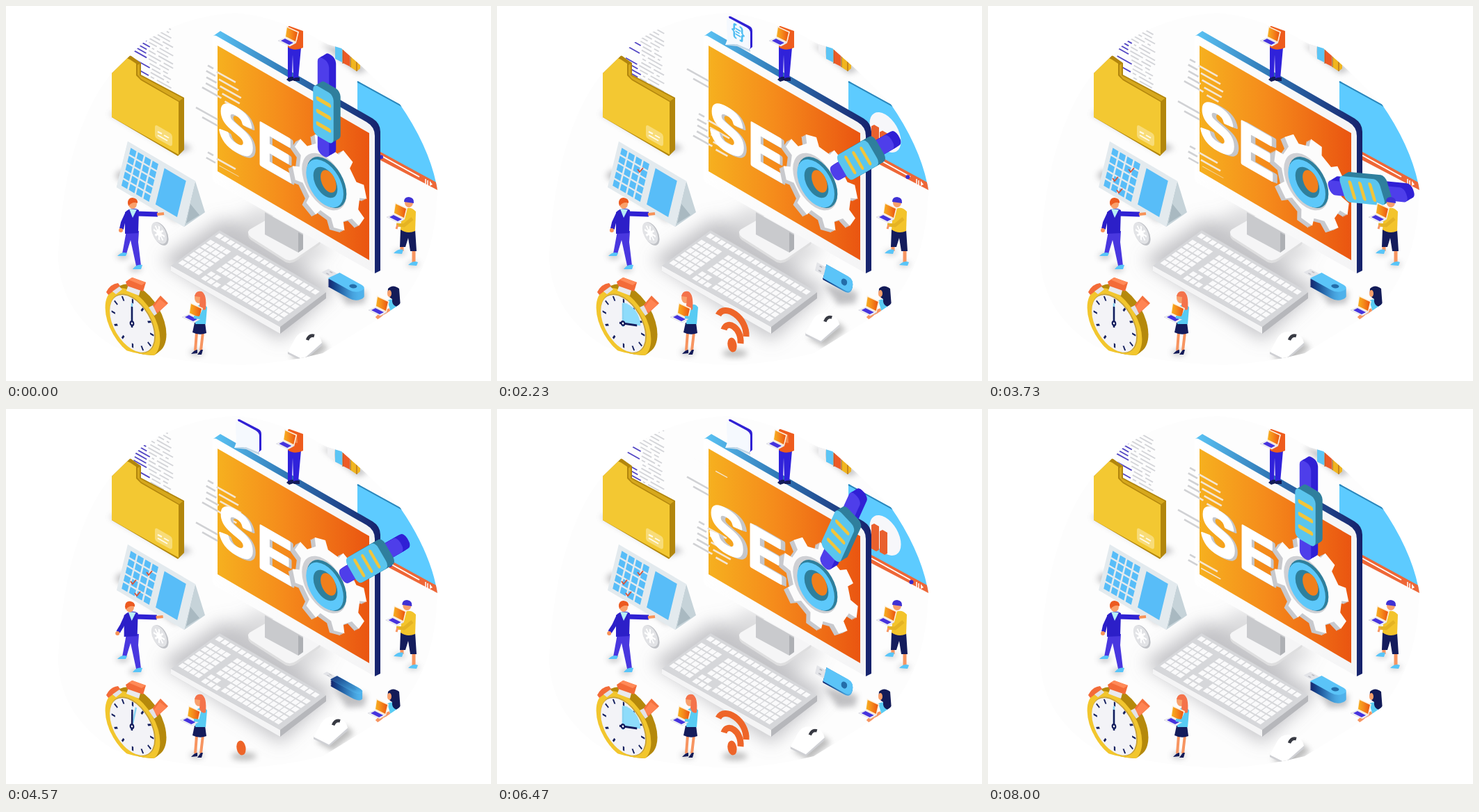
An HTML page for the animation above (8.03 s loop, 697x540 px).

```html
<!DOCTYPE html>
<html lang="en">
<head>
<meta charset="utf-8">
<title>SEO workspace</title>
<style>
html,body{margin:0;width:100%;height:100%;overflow:hidden;background:#fff}
svg{display:block;width:100vw;height:100vh}
text{font-family:"Liberation Sans",Arial,sans-serif;font-weight:bold}
</style>
</head>
<body>
<svg viewBox="0 0 697 540">
<defs>
<clipPath id="stage"><path d="M75 360C80 240 110 145 152 97L197 53C240 25 285 12 332 10Q370 14 402 27L427 36L462 55L482 61L518 93L565 140Q610 205 620 265Q618 370 565 430L530 454L455 500Q400 514 340 517Q270 515 212 503Q185 502 152 489C92 450 75 400 75 360Z"/></clipPath>
<clipPath id="offScreen"><path d="M270 64L304 83V229L270 210Z"/></clipPath>
<clipPath id="onScreen"><path d="M304 83L342 104V250L304 229Z"/></clipPath>
<clipPath id="sheet"><path d="M180 25H241V126L194 100V82L180 72Z"/></clipPath>
<linearGradient id="screen"><stop stop-color="#f6b01f"/><stop offset=".45" stop-color="#f58a1b"/><stop offset="1" stop-color="#ea5511"/></linearGradient>
<linearGradient id="edge"><stop stop-color="#5bc4f5"/><stop offset=".45" stop-color="#2f76b4"/><stop offset="1" stop-color="#16216b"/></linearGradient>
<linearGradient id="navy"><stop stop-color="#15246d"/><stop offset=".25" stop-color="#174a90"/><stop offset="1" stop-color="#51b5ee"/></linearGradient>
<linearGradient id="chin"><stop stop-color="#fff"/><stop offset="1" stop-color="#f4f4f5"/></linearGradient>
<filter id="blur" x="-30%" y="-30%" width="160%" height="160%"><feGaussianBlur stdDeviation="12"/></filter>
<filter id="soft" x="-50%" y="-50%" width="200%" height="200%"><feGaussianBlur stdDeviation="4"/></filter>
<g id="laptop">
<path d="M8 16L24 23L15 28L-2 20Z" fill="#f3f3f6" stroke="#d4d6de" stroke-width=".7"/>
<path d="M8 17L20 23L14 26L2 20Z" fill="#4634dd"/>
<path d="M10 -1L28 7L24 23L8 16Z" fill="#fdf0dc"/><path d="M11 1L26 8L23 21L9 14Z" fill="url(#screen)"/>
</g>
<g id="page"><rect width="1" height="1" fill="#e3eaee"/><g id="cells" fill="#58bdf8"><rect x=".56" y=".1" width=".32" height=".79"/></g></g>
<path id="stick" d="M0 -10H34Q44 -10 44 0Q44 10 34 10H0Z"/>
</defs>

<g clip-path="url(#stage)">
<rect width="697" height="540" fill="#fdfdfd"/>
<g fill="#8d8d93" filter="url(#blur)">
<path d="M222 366L310 306L474 408L395 482Z" opacity=".5"/><path d="M312 314L372 286L470 350L420 384Z" opacity=".3"/>
</g>
<g fill="#77777d" filter="url(#soft)" opacity=".45">
<path d="M148 155L248 212L268 205L170 150Z"/><path d="M156 245L165 235L250 300L246 312Z"/><path d="M453 55L475 60L520 92L505 97Z"/>
<ellipse cx="168" cy="360" rx="9" ry="4"/><ellipse cx="186" cy="378" rx="9" ry="4"/><ellipse cx="274" cy="499" rx="10" ry="4"/>
<ellipse cx="566" cy="355" rx="9" ry="3"/><ellipse cx="585" cy="372" rx="9" ry="3"/><path d="M470 400L518 412L515 428L490 430Z"/>
</g>

<g clip-path="url(#sheet)"><g id="docLines" stroke-width="1.8"/></g>

<!-- folder -->
<path d="M152 64L180 72L194 82V99L256 132V207L247 216L152 160Z" fill="#b2860d"/>
<path d="M152 66L178 77L187 83V100L194 107L248 138V214L152 160Z" fill="#f3c832"/>
<path d="M189 85L192 83V100L254 133L249 137L194 105L189 99Z" fill="#d6a81d"/>
<path d="M217 172L236 183Q239 185 239 188V198Q239 203 235 201L217 191Q214 189 214 186V175Q214 171 217 172Z" fill="#f8dc78"/>
<path d="M218 181L224 184M227 186L234 190M218 186L232 194" stroke="#fffbe8" stroke-width="2"/>

<!-- calendar -->
<path d="M272 252L286 297L256 318Z" fill="#c6d3d9"/><path d="M265 285L278 301L259 313Z" fill="#a9b9c1"/>
<path id="back" fill="#eef2f4"/>
<use href="#page" transform="matrix(97 57 -16 66 175 195)"/>
<g id="checks" fill="none" stroke="#d6533a" stroke-width="1.8"><path d="M185 265l3 4l5 -6"/><path d="M179 248l3 4l5 -6"/><path d="M202 235l3 4l5 -6"/></g>
<use id="flip" href="#page"/>

<!-- books -->
<path id="book" d="M462 50H472V73L462 68Z" fill="#f1f1f3"/>
<path d="M473 50L483 55V81L473 76Z" fill="#5cc5f5"/><path d="M484 55L494 60V87L484 82Z" fill="#ed5a26"/><path d="M495 60L509 70V90L504 94L495 88Z" fill="#f0b51f"/><path d="M484 60V83M495 68V88M504 78V94" stroke="#9d5720"/>

<!-- video window -->
<path d="M505 108L630 177V268L505 200Z" fill="#5dcbff"/><path d="M505 109L630 178" stroke="#2b86bb" stroke-width="2"/>
<g id="chart"><ellipse id="disc" transform="matrix(.866 .5 0 1 558 182)" fill="#f7f7fa"/><path id="bars" fill="#e9602d"/></g>
<path d="M538 210L622 256V266L538 222Z" fill="#ee6737"/><path d="M538 215L594 246" stroke="#fff" stroke-width="2"/>
<path d="M603 249v7M606 251v7" stroke="#fff" stroke-width="1.5"/><path d="M609 252l4 5l-4 2z" fill="#fff"/><circle id="knob" r="3" fill="#3a2bc9"/>

<!-- monitor -->
<path d="M350 326L388 304Q393 302 398 305L449 335Q455 340 449 345L417 367Q410 372 402 369L352 337Q345 331 350 326Z" fill="#dededf"/>
<path d="M350 322L388 300Q393 298 398 301L449 331Q455 336 449 341L417 363Q410 368 402 365L352 333Q345 327 350 322Z" fill="#f5f5f6"/>
<path d="M372 297L427 328V350L420 355L372 329Z" fill="#c9cacd"/><path d="M420 326L427 330V350L420 355Z" fill="#aeb0b4"/>
<path d="M298 43L308 36L527 162Q538 169 538 181V381L530 385L515 190L300 65Z" fill="url(#edge)"/>
<path d="M297 47Q297 40 304 44L518 167Q530 174 530 187V385L301 255Q297 252 297 247Z" fill="url(#chin)"/>
<path d="M304 57L522 183V366L304 238Z" fill="url(#screen)"/>
<g stroke-width="2.6"><g clip-path="url(#offScreen)" stroke="#d0d1d4"><g class="stream"/></g><g clip-path="url(#onScreen)" stroke="#f5e6d2"><g class="stream"/></g></g>
<g id="letters" font-size="87" stroke-width="4" stroke-linejoin="round"/>

<!-- gear -->
<g fill="#c8c9cd"><path class="gear"/><path class="gear"/><path class="gear"/></g><path class="gear" fill="#fcfcfc"/>
<g transform="matrix(.866 .5 0 1 459 254)"><circle r="37" cx="-2" fill="#cfd0d4"/><circle r="33" cx="2" cy="-1" fill="#2e7f9c"/><circle r="31" cx="-1" cy="2" fill="#5dc8fa"/><circle r="20" fill="#2e7f9c"/><ellipse cx="5" cy="-4" rx="13" ry="15" fill="#f07f1c"/></g>
<g id="wrench"/>

<!-- keyboard -->
<path d="M237 374L394 462L460 412V421L394 472L237 382Z" fill="#b6b7bb"/><path d="M237 374L394 462V472L237 382Z" fill="#f4f4f5"/>
<path d="M307 323L460 412L394 462L237 374Z" fill="#d6d7da"/>
<g id="keys" transform="matrix(153 89 -70 51 307 323)" fill="#fafafb"/>

<!-- usb -->
<g id="usbSide" fill="url(#navy)"/>
<g id="usb"><rect x="-14" y="-6" width="16" height="12" fill="#e3e4e8"/><path d="M-9 -3h4M-9 3h4" stroke="#b9bbc2" stroke-width="2"/>
<use href="#stick" fill="#5bc4f8"/><use id="usbShade" href="#stick" fill="url(#navy)"/><circle id="hole" cx="31" r="4.5" fill="#246da9"/></g>

<!-- mouse -->
<g id="mouse"><path d="M457 470L500 448L512 458L482 484Z" fill="#888" opacity=".55" filter="url(#soft)"/>
<path d="M454 463L476 474Q482 452 492 448Q500 446 503 451V455L476 478L454 467Z" fill="#cfd0d4"/><path d="M454 464L465 444Q472 432 488 436Q501 440 503 451L476 475Z" fill="#fff"/>
<path d="M482 447Q485 439 492 441" fill="none" stroke="#383a43" stroke-width="4.5"/></g>

<!-- clock -->
<g transform="matrix(.866 .5 0 1 182 457)">
<circle cx="11" cy="-12" r="45" fill="#b5890c"/><circle cx="6" cy="-6" r="45" fill="#b5890c"/><circle r="45.500" fill="#f2c62d"/><circle r="38" fill="#c7a13a"/><circle cx="-1" cy="1" r="37" fill="#f3f3f7"/>
<g id="ticks" stroke="#15205f" stroke-width="2.6"/></g>
<g transform="matrix(.84 .12 0 1 181 457)"><path id="wedge" fill="#8edcfb"/>
<path id="minute" d="M0 5V-29" stroke="#8ad3f2" stroke-width="3"/><path id="hour" d="M0 6V-24" stroke="#141c5c" stroke-width="3"/><circle r="4" fill="#141c5c"/><circle r="1.5" fill="#fff"/></g>
<path d="M176 401L194 406L191 417L173 410Z" fill="#e9e9ed"/><path d="M172 397L181 391L201 398L197 411L174 403Z" fill="#f36b38"/><path d="M176 394L182 391L201 398L195 402Z" fill="#ff8a58"/>
<path d="M144 412Q150 400 161 399L164 403L147 416Z" fill="#f36b38"/><path d="M153 411L163 404L167 408L158 415Z" fill="#e2e2e8"/>
<path d="M208 434L222 417L233 428L217 443Z" fill="#f4713e"/><path d="M211 435L221 422L231 430L218 441Z" fill="#ff8453"/><path d="M205 434L211 431L217 443L213 446Z" fill="#e2e2e8"/>

<!-- coin -->
<g transform="matrix(.8 .5 0 1 220 327)"><circle cx="2" r="15" fill="#bfc1c6"/><circle r="14" fill="#e2e3e6"/><path id="flower" fill="#fff"/></g>

<!-- wifi -->
<g id="wifi" fill="none" stroke="#ee6529" stroke-width="9"><g><ellipse cx="342" cy="500" rx="18" ry="6" fill="#666" stroke="none" opacity=".4" filter="url(#soft)"/><ellipse cx="338" cy="488" rx="4" ry="8" stroke-width="5" fill="#ee6529" transform="rotate(-10 338 488)"/></g><path d="M326 466C330 451 352 463 350 486"/><path d="M318 445C327 427 360 449 358 476"/></g>

<!-- bubble -->
<g id="bubble"><path d="M333 16Q333 14 336 15L363 29Q367 31 367 36V59L362 63L340 30Z" fill="#3021d4"/>
<path d="M330 22Q330 16 335 18L359 31Q364 34 364 39V59Q364 64 359 62L345 55L328 56L331 48Z" fill="#f5f9fe"/><path d="M328 56L345 55L364 63V66L345 58Z" fill="#c5d9e8"/>
<g transform="matrix(.866 .5 0 1 346 44)" fill="#4fbdf2" font-size="23" text-anchor="middle"><g id="braces"><text x="-6">{</text><text x="7">}</text></g><path id="code" d="M-4 -10H5M-4 -6H3M-4 -2H5" stroke="#4fbdf2" stroke-width="2"/></g></g>

<!-- man above -->
<path d="M405 58L424 60L420 105H413L412 70L411 104H405Z" fill="#3022da"/><path d="M403 106Q408 101 413 102V107L407 109ZM411 106Q415 102 422 103L422 108H414Z" fill="#131b58"/>
<path d="M405 30Q415 22 427 30V60Q414 66 405 59Z" fill="#ee5c1d"/><path d="M418 36L411 48L419 49Z" fill="#f28b52"/>
<use class="lap" href="#laptop" x="393" y="30"/>

<!-- pointing man -->
<path d="M173 324H191L190 340L194 374H187L179 337L173 357H167Z" fill="#4937df"/>
<path d="M160 360Q167 353 174 356L172 360ZM182 379Q188 371 196 373L194 379Z" fill="#58c5f8"/>
<g id="guy"><path d="M171 297Q181 288 191 294L190 327L171 328Z" fill="#2c1fc8"/><path d="M177 292L188 293L182 305Z" fill="#b7eef5"/>
<path d="M188 299L218 300" stroke="#3022d3" stroke-width="7"/><path d="M217 300L227 299" stroke="#f79257" stroke-width="4"/>
<path id="arm" fill="none" stroke="#2c1fc8" stroke-width="6"/><circle id="hand" cy="323" r="3" fill="#f79257"/></g>
<g id="guyHead"><ellipse cx="182" cy="285" rx="6" ry="7" fill="#f9a06b"/><path d="M175 284Q175 276 182 276Q190 277 189 284Q182 281 176 288Z" fill="#ec5a20"/></g>

<!-- standing woman -->
<path d="M274 470L272 496M283 470L280 496" stroke="#f79561" stroke-width="4"/><path d="M266 501Q271 495 275 495V500ZM275 502L280 495H283L281 502Z" fill="#131b58"/>
<path d="M271 456H286L288 471Q278 475 268 470Z" fill="#141c5c"/><path d="M274 433Q284 426 289 434L287 458H272Z" fill="#58cbf3"/>
<g id="herHead"><ellipse cx="277" cy="420" rx="6" ry="8" fill="#f9a06b"/><path d="M271 418Q273 409 281 411Q289 415 287 437Q281 440 278 431L279 419Z" fill="#f4734b"/></g>
<use class="lap" href="#laptop" x="255" y="428"/><path d="M284 438L279 449L270 448" fill="none" stroke="#58cbf3" stroke-width="4"/>

<!-- man in yellow -->
<path d="M569 345V353M586 345V371" stroke="#f79561" stroke-width="5"/><path d="M567 322H588L590 353H581L578 334L574 347H566Z" fill="#141c5c"/><path d="M557 356Q564 349 571 351L569 357ZM578 373Q585 366 592 369L590 374Z" fill="#58c5f8"/>
<path d="M569 295Q580 286 589 296L588 324Q577 329 567 322Z" fill="#f3c42b"/><path d="M584 306L572 316L561 315" fill="none" stroke="#e5b323" stroke-width="5"/><path d="M563 315L561 321" stroke="#f79561" stroke-width="3"/>
<g id="capHead"><ellipse cx="579" cy="283" rx="6" ry="7" fill="#f9a06b"/><path d="M572 282Q572 275 579 275Q587 276 586 284Z" fill="#3f31d4"/></g>
<use class="lap" href="#laptop" x="549" y="284"/>

<!-- seated woman -->
<path d="M533 450L541 442L552 438" fill="none" stroke="#f79561" stroke-width="6"/><path d="M548 424Q562 418 566 434L553 441Z" fill="#58cbf3"/>
<path d="M549 407Q556 400 565 407L567 433Q554 434 555 422Q547 418 549 407Z" fill="#131b58"/><ellipse cx="551" cy="414" rx="3" ry="5" fill="#f9a06b"/>
<use class="lap" href="#laptop" x="523" y="418"/>
</g>
</svg>
<script>
const LOOP = 8030, HALF = LOOP / 2, THIRD = LOOP / 3, STEP = LOOP / 6;
const $ = s => document.querySelector(s), all = s => [...document.querySelectorAll(s)];
const set = (el, o) => { for (const k in o) el.setAttribute(k, o[k]); };
const add = (to, tag, o = {}) => {
  const el = document.createElementNS('http://www.w3.org/2000/svg', tag);
  set(el, o); to.append(el); return el;
};
const iso = (x, y) => `matrix(.866 .5 0 1 ${x} ${y})`;
const show = (el, v) => set(el, {opacity: v});
const move = (el, x, y = 0) => set(el, {transform: `translate(${x} ${y})`});

// Eased 0 to 1 between a and b; pulse also falls back to 0
const ease = x => x < .5 ? 2 * x * x : 1 - 2 * (1 - x) ** 2;
const ramp = (t, a, b) => ease(Math.min(1, Math.max(0, (t - a) / (b - a))));
const pulse = (t, on, off, rise = 250, fall = rise) => ramp(t, on, on + rise) - ramp(t, off, off + fall);

let seed = 7;
const rand = (a, b) => {
  seed = seed * 16807 % 2147483647;
  return a + (b - a) * seed / 2147483647;
};

function gearPath(n, outer, inner, phase) {
  const pts = [], pitch = 360 / n;
  for (let i = 0; i < n; i++)
    for (const [r, d] of [[inner, -.27], [outer, -.19], [outer, .19], [inner, .27]]) {
      const a = (phase + (i + d) * pitch) * Math.PI / 180;
      pts.push((r * Math.sin(a)).toFixed(1), (-r * Math.cos(a)).toFixed(1));
    }
  return `M${pts.join(' ')}Z`;
}

// Keyboard: function row, number pad, main block, arrows
const key = (x, y) => add($('#keys'), 'rect', {x, y, width: .042, height: .088});
for (let i = 0; i < 18; i++) key(.02 + i * .053, .05);
for (let r = 0; r < 6; r++) {
  const y = .23 + r * .115;
  for (let c = 0; c < 4; c++) key(.02 + c * .05, y);
  for (let c = r > 3 ? 3 : 0; c < 14; c++) key(.27 + c * .05, y);
}
for (let c = 0; c < 5; c++) key(.25 + c % 3 * .053, c < 3 ? .84 : .72);

for (let i = 0; i < 20; i++)
  add($('#cells'), 'rect', {x: .06 + i % 4 * .108, y: .09 + (i >> 2) * .172, width: .084, height: .135});
for (let i = 0; i < 12; i++)
  add($('#ticks'), 'path', {d: 'M0 -35V-29', transform: `rotate(${i * 30})`});
set($('#flower'), {d: gearPath(8, 10, 5, 0)});

// Scrolling text lines
const dash = (to, y, a, b, o = {}) =>
  add(to, 'path', {d: `M${a} ${y + (a - 280) * .56}L${b} ${y + (b - 280) * .56}`, ...o});
const CYCLE = 125, DOC = 72;
const streams = all('.stream');
const row = (y, a, b) => {
  for (const g of streams) for (const k of [-1, 0, 1]) dash(g, y + k * CYCLE, a, b);
};
for (let y = 80; y < 125; y += 9) {
  const cut = rand(298, 312);
  row(y, rand(279, 291), cut);
  row(y + 2, cut + 5, rand(325, 342));
}
row(150, 273, 304);
row(159, 282, 304);

const docLines = $('#docLines');
for (let i = 0; i < 12; i++) {
  const a = rand(182, 190), b = rand(198, 208), cut = rand(212, 228), end = rand(230, 241), blue = rand(0, 1) < .7;
  for (const k of [-1, 0, 1]) {
    const y = 70 + i * 6 + k * DOC;
    if (blue) dash(docLines, y, a, b, {stroke: '#5145c4'});
    dash(docLines, y, b + 3, cut, {stroke: '#d3d4d8'});
    dash(docLines, y, cut + 4, end, {stroke: '#d3d4d8'});
  }
}

const layers = [4, 2, 0].map(d => {
  const tone = d ? '#c5c6ca' : '#fff', g = add($('#letters'), 'g', {fill: tone, stroke: tone});
  add(g, 'text', {x: 1}).textContent = 'S';
  add(g, 'text', {x: 65}).textContent = 'E';
  return [g, d];
});

// Wrench: stacked outlines give the thickness
const wrench = [];
function part(width, height, top, front, side) {
  for (let d = 10; d >= 0; d -= 2) {
    const g = add($('#wrench'), 'g');
    add(g, 'rect', {x: -width / 2, y: top, width, height, rx: 8, fill: d ? side : front});
    wrench.push([g, d]);
  }
  return wrench[wrench.length - 1][0];
}
part(19, 140, -182, '#4e3eea', '#3020d5');
const grip = part(34, 72, -138, '#5ac5ee', '#2f7f9d');
for (let i = 0; i < 3; i++)
  add(grip, 'path', {d: `M-9 ${i * 18 - 120}H10`, stroke: '#f2c53a', 'stroke-width': 6, 'stroke-linecap': 'round'});

const gears = all('.gear');
gears.forEach(g => set(g, {d: gearPath(8, 62, 50, -15)}));

const usbSide = [...Array(6)].map(() => add($('#usbSide'), 'use', {href: '#stick'}));

function drawUsb(h) {
  const half = (ramp(h, 250, 800) + ramp(h, 1300, 2050)) / 2;
  const flip = Math.PI * (half - ramp(h, 2700, 3500)), c = Math.cos(flip), s = Math.abs(Math.sin(flip));
  const wx = (-11 - 6 * c + 6 * s) / 20, wy = (14 - 6 * c - 7 * s) / 20, thick = 7 + 5 * c;
  const pose = drop => `matrix(.9 .5 ${wx} ${wy} 471 ${385 + 3 * c + drop})`;
  usbSide.forEach((el, i) => set(el, {transform: pose(thick * (1 - i / 6))}));
  set($('#usb'), {transform: pose(0)});
  show($('#usbShade'), s);
  show($('#hole'), 1 - s);
}

function drawClock(h) {
  const hour = 90 * pulse(h, 435, 2900, 1500, 700), a = hour * Math.PI / 180;
  set($('#hour'), {transform: `rotate(${hour})`});
  set($('#minute'), {transform: `rotate(${hour * 12})`});
  set($('#wedge'), {d: `M0 0V-30A30 30 0 0 1 ${30 * Math.sin(a)} ${-30 * Math.cos(a)}Z`});
}

// Page turns about its top edge, once per third of the loop
function drawCalendar(c) {
  const turn = c / 950 * 320, a = turn * Math.PI / 180;
  const vx = -16 * Math.cos(a) - 45 * Math.sin(a), vy = 66 * Math.cos(a) + 5 * Math.sin(a);
  set($('#flip'), {transform: `matrix(97 57 ${vx} ${vy} 175 195)`, opacity: turn < 80 ? 1 : 0});
  set($('#back'), {d: `M175 195l97 57l${vx} ${vy}l-97 -57Z`, opacity: turn >= 80 && turn < 320 ? 1 : 0});
  [...$('#checks').children].forEach((el, i) => show(el, pulse(c, 520 + i * 180, 1950 + i * 150, 60)));
}

// Gear, wrench and letters go three steps out and three back
function drawGear(t) {
  const steps = Math.floor(t / STEP) + ramp(t % STEP, 0, 560);
  const turn = 22.5 * (3 - Math.abs(3 - steps)), spin = ` rotate(${turn})`;
  gears.forEach((g, i) => set(g, {transform: iso(459 + i * 2, 257 - i) + spin}));
  wrench.forEach(([g, d]) => set(g, {transform: iso(456 + d, 258 - d * .6) + spin}));
  const odd = 1 - Math.abs(turn % 45 / 22.5 - 1);
  layers.forEach(([g, d]) => set(g, {transform: iso(305 + d * (1 + odd * .6) - odd, 193 + d * .6 - odd * 2)}));
}

function drawChart(h) {
  show($('#chart'), pulse(h, 1650, 2850, 150));
  const r = 26 * pulse(h, 1650, 2800, 400), rise = 34 * pulse(h, 1950, 2750, 400);
  set($('#disc'), {rx: r, ry: r});
  const bar = (x, y, v) => `M${x} ${y}v${-v}l4 -2l7 4v${v}l-4 2Z`;
  set($('#bars'), {d: bar(538, 201, rise) + bar(550, 206, rise * .88)});
  const x = 539 + .023 * h;
  set($('#knob'), {cx: x, cy: 217 + (x - 538) * .56});
}

function drawPeople(h) {
  const lean = pulse(h, 200, 1600, 600), reach = pulse(h, 300, 850, 550) * 8 + pulse(h, 2200, 2500, 300) * 4;
  move($('#guyHead'), -6 * lean, lean);
  move($('#guy'), -2 * lean);
  set($('#arm'), {d: `M174 299L168 312L${166 - reach} 321`});
  set($('#hand'), {cx: 165 - reach});
  move($('#herHead'), -6 * pulse(h, 900, 2250, 450, 200));
  const sway = -4 * pulse(h, 200, 2600, 600), tip = -4 * (pulse(h, 200, 1100, 600, 350) + pulse(h, 2230, 2700, 240));
  move($('#capHead'), sway);
  all('.lap').forEach((el, i) => move(el, i ? sway / i : tip));
}

function draw(time) {
  const t = time % LOOP, h = t % HALF;
  drawGear(t);
  drawUsb(h);
  drawClock(h);
  drawCalendar(t % THIRD);
  drawChart(h);
  drawPeople(h);
  streams.forEach(g => move(g, 0, CYCLE * h / HALF));
  move(docLines, 0, DOC * h / HALF);
  const slide = pulse(h, 100, 1940, 700, 880) - 1;
  move($('#mouse'), 49 * slide, -34 * slide);
  show($('#bubble'), pulse(h, 250, 2750));
  show($('#braces'), pulse(h, 600, 2300, 150));
  show($('#code'), pulse(h, 1000, 2260, 300, 100));
  [...$('#wifi').children].forEach((el, i) => show(el, pulse(h, 400 + i * 260, 3050 - i * 160, 150)));
  show($('#book'), pulse(t, 200, 7700, 60));
}

const start = performance.now();
function frame() {
  draw(performance.now() - start);
  requestAnimationFrame(frame);
}
draw(0);
requestAnimationFrame(frame);
</script>
</body>
</html>
```
